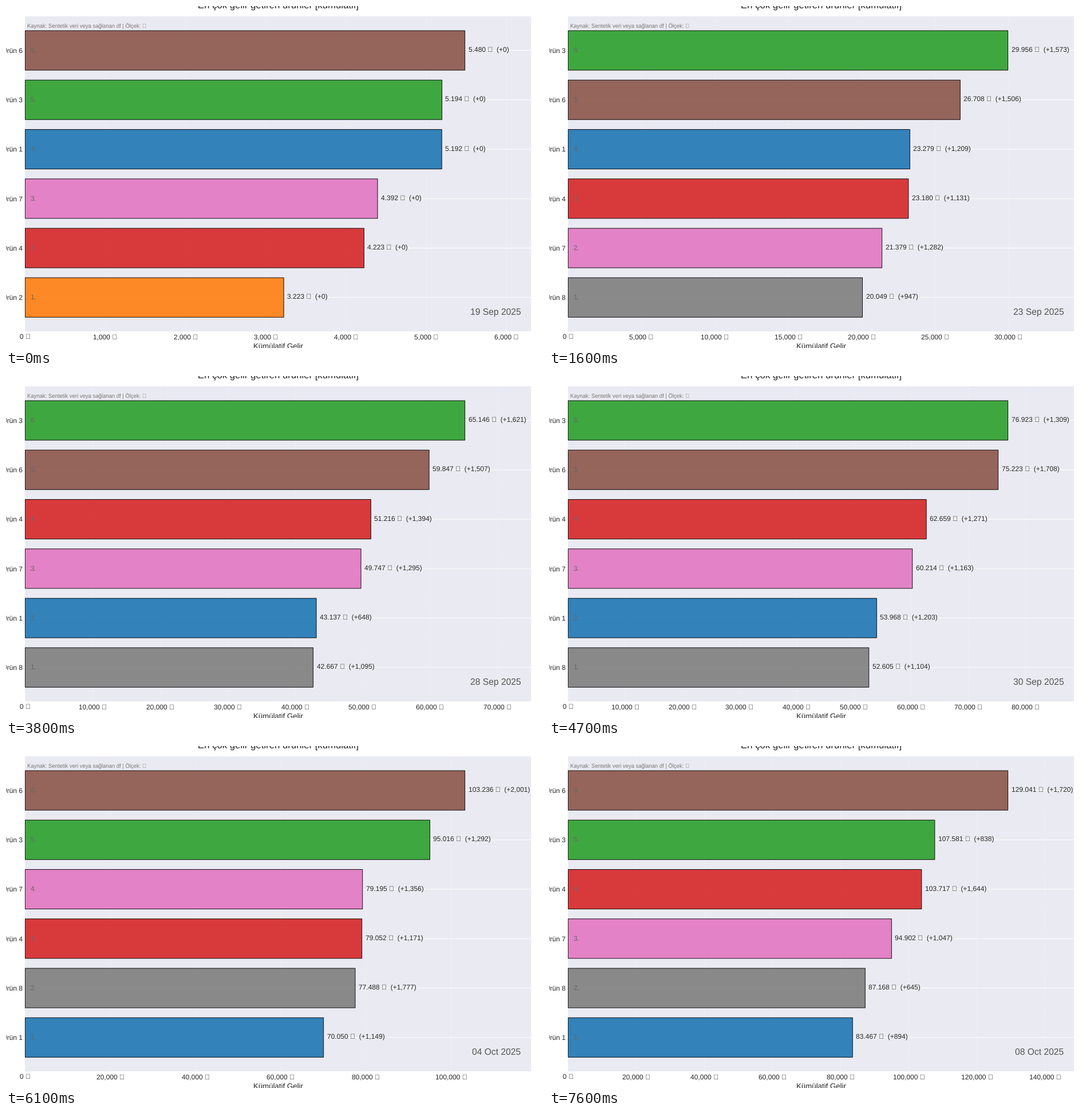
Animation of 938x597 px, one loop 7.7 s. Source, as a matplotlib script:

```python
import matplotlib.pyplot as plt
import numpy as np
from matplotlib.animation import FuncAnimation
from matplotlib.ticker import FuncFormatter

W, H, DPI = 938, 597, 72          # at 72 dpi one point is one pixel
STEPS, DAYS, TOP = 4, 20, 6
FRAMES = (DAYS - 1) * STEPS + 1
INK = "0.15"
BOX = "\ufdd0"                    # no such glyph: drawn as an empty box

plt.rcParams.update({
    "font.family": "Liberation Sans",
    "font.size": 12,
    "text.hinting": "none",
    "text.color": INK,
    "axes.labelcolor": INK,
    "xtick.color": INK,
    "ytick.color": INK,
    "axes.axisbelow": True,
})

# Cumulative revenue grows steadily between a few key days
KEY_DAYS = [0, 1.75, 6.5, 9.5, 11.75, 15.25, 19]
KEYS = {
    1: [5192, 12400, 35367, 43137, 53968, 70050, 83467],
    2: [3223, 56400],
    3: [5194, 15796, 45689, 65146, 76923, 95016, 107581],
    4: [4223, 13004, 34486, 51216, 62659, 79052, 103717],
    6: [5480, 13156, 41765, 59847, 75223, 103236, 129041],
    7: [4392, 9837, 34204, 49747, 60214, 79195, 94902],
    8: [2900, 11523, 29522, 42667, 52605, 77488, 87168],
}


def growth(keys):
    at = KEY_DAYS if len(keys) > 2 else [0, DAYS - 1]
    return np.interp(np.arange(FRAMES) / STEPS, at, keys)


totals = {k: growth(keys) for k, keys in KEYS.items()}


def date_text(day):
    n = 19 + day
    return f"{n:02d} Sep 2025" if n <= 30 else f"{n - 30:02d} Oct 2025"


def value_text(value, gain):
    amount = f"{value:,.0f}".replace(",", ".")
    return f"{amount} {BOX}  (+{gain:,.0f})"


fig = plt.figure(figsize=(W / DPI, H / DPI), dpi=DPI, facecolor="white")
left, right, top, bottom = 33.4, 916.8, 18.0, 568.3
ax = fig.add_axes([left / W, 1 - bottom / H, (right - left) / W, (bottom - top) / H],
                  facecolor="#EAEAF2")
ax.spines[:].set_visible(False)
ax.set_ylim(-0.69, TOP - 0.31)
ax.grid(axis="y", color="white", lw=0.96, snap=False)
ax.grid(axis="x", color="white", lw=0.96, ls="--", alpha=0.3, snap=False)
ax.tick_params(length=0, pad=4.2, labelsize=12)
ax.xaxis.set_major_formatter(FuncFormatter(lambda v, _: f"{v:,.0f} {BOX}"))
ax.set_xlabel("Kümülatif Gelir", fontsize=13.2, labelpad=4.8)


def pixel_text(x, y, text, **style):
    return fig.text(x / W, 1 - y / H, text, **style)


pixel_text((left + right) / 2, 3.6, "En çok gelir getiren ürünler [kümülatif]",
           fontsize=16.8, ha="center", va="baseline")
pixel_text(37.4, 29, f"Kaynak: Sentetik veri veya sağlanan df | Ölçek: {BOX}",
           fontsize=9.55, ha="left", va="top", color="#777777")
date = pixel_text(899.2, 539, "", fontsize=15.6, ha="right", va="baseline",
                  color="#555555")

bars = ax.barh(range(TOP), [1] * TOP, height=0.8, edgecolor="black",
               linewidth=1, alpha=0.9, snap=False)
labels = [ax.annotate("", (0, i), xytext=(6, 0), textcoords="offset points",
                      ha="left", va="center") for i in range(TOP)]
for i in range(TOP):
    ax.text(0.01, i, f"{i + 1}.", transform=ax.get_yaxis_transform(),
            ha="left", va="center", color="#666666")


def draw(frame):
    ranked = sorted(totals, key=lambda k: totals[k][frame])[-TOP:]
    for i, (k, bar, label) in enumerate(zip(ranked, bars, labels)):
        value = totals[k][frame]
        bar.set_width(value)
        bar.set_facecolor(f"C{k - 1}")
        label.xy = (value, i)
        label.set_text(value_text(value, value - totals[k][max(frame - 1, 0)]))
    ax.set_yticks(range(TOP), [f"Ürün {k}" for k in ranked])
    ax.set_xlim(0, totals[ranked[-1]][frame] * 1.15)
    date.set_text(date_text(frame // STEPS))
    return []


anim = FuncAnimation(fig, draw, frames=FRAMES, interval=100, repeat=True,
                     repeat_delay=0, init_func=lambda: draw(0), blit=False)
plt.show()
```
